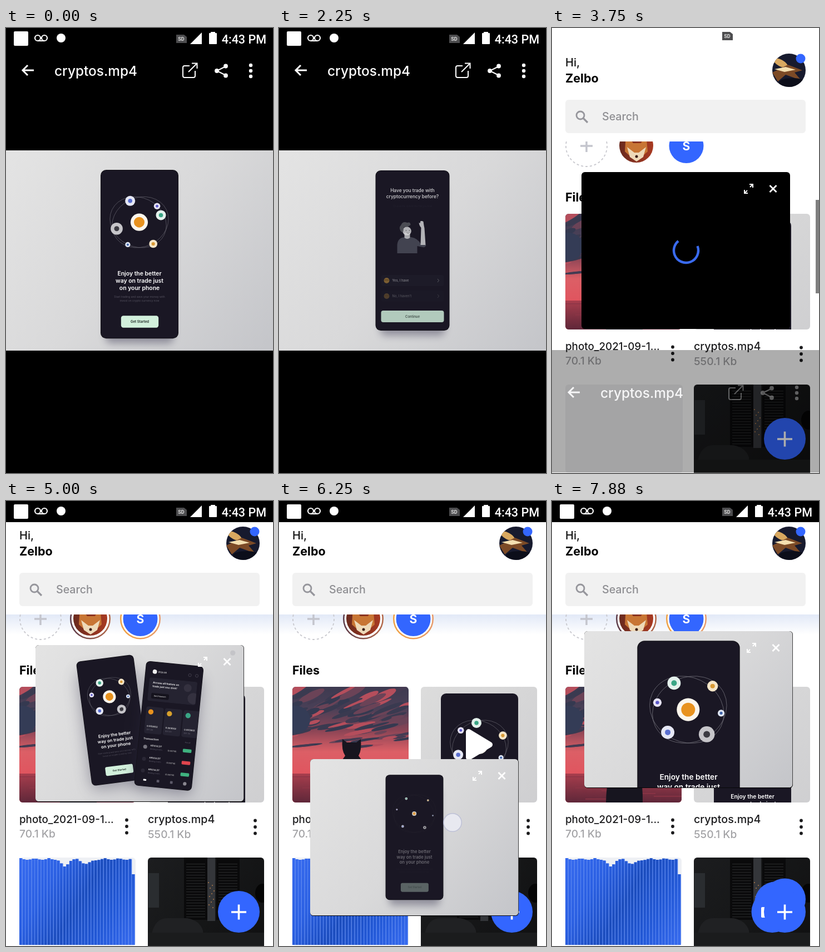
Animation of 480x800 px, one loop 8000 ms. Source, as an HTML page with a canvas:

```html
<!DOCTYPE html>
<html lang="en">
<head>
<meta charset="utf-8">
<title>Video pop-up</title>
<style>
html, body { margin: 0; width: 100%; height: 100%; overflow: hidden; background: #000; }
canvas { display: block; }
</style>
</head>
<body>
<canvas id="stage" width="480" height="800"></canvas>
<script>
const LOOP = 8000, STEP = 125, BLUE = '#3366ff', NIGHT = '#1a1724';
const stage = document.getElementById('stage').getContext('2d');
const sheetCanvas = Object.assign(document.createElement('canvas'), { width: 480, height: 800 });
const sheet = sheetCanvas.getContext('2d');
let g = stage;

const clamp = v => Math.max(0, Math.min(1, v));
const mix = (a, b, p) => a + (b - a) * p;
const ramp = (t, from, length) => clamp((t - from) / length);
const sine = p => (1 - Math.cos(Math.PI * p)) / 2;
const cubic = p => p < .5 ? 4 * p ** 3 : 1 - 4 * (1 - p) ** 3;
const noise = n => Math.abs(Math.sin(n * 12.9898) * 43758.5453) % 1;

// Drawing helpers
function group(draw, { x = 0, y = 0, s = 1, r = 0, a = 1 } = {}) {
  if (a <= 0) return;
  g.save();
  g.globalAlpha *= a;
  g.translate(x, y);
  g.rotate(r * Math.PI / 180);
  g.scale(s, s);
  draw();
  g.restore();
}
function box(x, y, w, h, fill, r = 0) {
  g.beginPath();
  g.roundRect(x, y, w, h, r);
  g.fillStyle = fill;
  g.fill();
}
function disc(x, y, r, fill) {
  g.beginPath();
  g.arc(x, y, Math.max(0, r), 0, 7);
  g.fillStyle = fill;
  g.fill();
}
function ring(x, y, r, color, width, from = 0, to = Math.PI * 2) {
  g.beginPath();
  g.arc(x, y, r, from, to);
  g.strokeStyle = color;
  g.lineWidth = width;
  g.stroke();
}
function blob(x, y, rx, ry, fill, tilt = 0) {
  g.beginPath();
  g.ellipse(x, y, rx, ry, tilt, 0, 7);
  g.fillStyle = fill;
  g.fill();
}
function line(d, color, width) {
  g.strokeStyle = color;
  g.lineWidth = width;
  g.stroke(new Path2D(d));
}
function shape(d, fill) {
  g.fillStyle = fill;
  g.fill(new Path2D(d));
}
function text(s, x, y, size, color, weight = 500, align = 'left', font = 'Inter') {
  g.font = `${weight} ${size}px ${font}, sans-serif`;
  g.fillStyle = color;
  g.textAlign = align;
  g.fillText(s, x, y + size * .36);
}
function blend(x0, y0, x1, y1, ...colors) {
  const fill = g.createLinearGradient(x0, y0, x1, y1);
  colors.forEach((c, i) => fill.addColorStop(i / (colors.length - 1), c));
  return fill;
}
function clipped(x, y, w, h, r, draw) {
  g.save();
  g.beginPath();
  g.roundRect(x, y, w, h, r);
  g.clip();
  draw();
  g.restore();
}
function dots(x, y, gap, r, color) {
  for (const i of [-1, 0, 1]) disc(x, y + i * gap, r, color);
}

// Phone screens, drawn on a body of 133 by 288
const COINS = [ // rest angle, turn, orbit radius, size, colours
  [-118, 100, 39, 8.6, '#e4f1ec', '#3aa585'],
  [-44, 101, 44, 7, '#f6e6c8', '#d99a35'],
  [-167, 125, 41, 5.5, '#e6e3f4', '#5a57c8'],
  [6, 111, 43, 4.4, '#dfe6f4', '#3d62a8'],
  [132, 115, 39.6, 8.6, '#e6e8f5', '#5a6fd0'],
  [53, 111, 40, 10.3, '#c6c5c9', '#3c3b42']
];

function orbit(spin, size, alpha) {
  group(() => {
    for (const side of [-1, 1]) {
      g.beginPath();
      g.ellipse(side * 1.8, 0, 49.5, 42, side * -.45, 0, 7);
      g.strokeStyle = '#77757f';
      g.lineWidth = .55;
      g.stroke();
    }
  }, { x: 66, y: 89.4, a: alpha * alpha });
  group(() => {
    disc(0, 0, 14.8 * size, '#fbf6ec');
    disc(0, 0, 9 * size, '#e8921e');
    for (const [rest, turn, far, r, rim, core] of COINS) {
      const a = (rest + turn * spin) * Math.PI / 180;
      disc(Math.cos(a) * far, Math.sin(a) * far, r * size, rim);
      disc(Math.cos(a) * far, Math.sin(a) * far, r * size * .42, core);
    }
  }, { x: 66, y: 89.4, a: size > 0 ? Math.max(alpha, .8) : 0 });
}

function welcome(spin, show = 1, button = show) {
  orbit(spin, show, show);
  group(() => {
    ['Enjoy the better', 'way on trade just', 'on your phone'].forEach((s, i) =>
      text(s, 66.5, 177 + i * 12.3, 9.9, '#fff', 600, 'center'));
  }, { a: show });
  group(() => {
    text('Start trading and save your money with', 66.5, 216.6, 4.7, '#55525f', 400, 'center');
    text('invest on crypto currency now', 66.5, 223.4, 4.7, '#55525f', 400, 'center');
  }, { a: show * show });
  group(() => {
    box(35, 249, 64, 20.5, '#d2f0dc', 4);
    text('Get Started', 67, 259.3, 5.7, '#1b2622', 600, 'center');
  }, { a: button });
}

function man() {
  shape('M39 149V134Q40 121 52 120H64Q76 122 82 133L91 134Q90 139 85 138L75 136V149Z', '#4b4d5a');
  shape('M81 134L82 103Q79 100 78 94L80 95L81 91H83L84 91L86 92L87 99L88 104L90 134Z', '#d4d4d6');
  shape('M52 112H62V121Q57 125 52 121Z', '#c6c6c9');
  disc(56.5, 109, 7.8, '#d4d4d6');
  shape('M47 111Q40 104 46 98Q49 91 57 94Q63 92 63 98Q58 102 51 102L50 110Z', '#56575d');
  disc(55, 108, .8, '#333');
  disc(61, 108, .8, '#333');
  line('M56 112Q59 114.500 61 112', '#444', .7);
}

function question(t) {
  const from = start => ramp(t, start, 350);
  group(() => {
    text('Have you trade with', 66.5, 35.5, 8.4, '#f4f4f6', 500, 'center');
    text('cryptocurrency before?', 66.5, 47.3, 8.4, '#f4f4f6', 500, 'center');
  }, { a: from(1950) });
  group(() => text('Choose the option that fits you now', 66.5, 64, 4.2, '#65636e', 400, 'center'), { a: from(2200) });
  group(man, { a: from(1960) });
  [['Yes, I have', 198, 2080], ['No, I haven’t', 226, 2160]].forEach(([label, y, start]) => group(() => {
    box(10, y - 10, 113, 20, '#211f2d', 4);
    disc(20, y, 5, '#e2a63d');
    box(16, y - 2, 8, 2, '#4c3418', 1);
    text(label, 30, y, 5.8, '#eee', 500);
    line(`M111.500 ${y - 3}l2.500 3l-2.500 3`, '#bbb', .8);
  }, { a: from(start) }));
  group(() => {
    box(10, 252, 113, 21, '#d2f0dc', 4);
    text('Continue', 66.5, 262.5, 6, '#1b2622', 500, 'center');
  }, { a: from(1960) });
}

function market() {
  const card = '#252331', dim = '#5d5a69';
  disc(22, 23, 5, '#eee');
  text('$126.08', 30, 23, 5, '#ddd', 600);
  ring(103, 23, 3.3, dim, .7);
  ring(119, 23, 3.3, dim, .7);
  clipped(11, 37, 111, 54, 5, () => {
    box(11, 37, 111, 54, card);
    disc(101, 53, 9, '#34313f');
    disc(116, 76, 13, '#34313f');
  });
  text('Access all feature on', 20, 48, 6, '#fff', 600);
  text('trade just one click!', 20, 56.5, 6, '#fff', 600);
  box(19, 72, 41, 13, '#15131d', 3);
  text('Get Premium', 39, 78.5, 4.6, '#ddd', 500, 'center');
  ['#e8921e', '#d8a12c', '#3aa585'].forEach((c, i) => {
    const x = 11 + i * 43;
    clipped(0, 100, 132, 70, 0, () => box(x, 104, 40, 62, card, 5));
    disc(x + 11, 116, 6, c);
    text('0.003602', x + 5, 149, 5.2, '#eee', 600);
    text('$91.99', x + 5, 157, 4.6, dim, 500);
  });
  text('Transaction', 11, 178, 6.2, '#eee', 600);
  text('See all', 107, 178, 4, dim);
  [195, 223, 250].forEach((y, i) => {
    disc(17, y + 2, 4.5, i ? '#2a2735' : '#77757f');
    text('KRV/ULDT', 29, y - 2, 5.2, '#eee', 600);
    text('Binding 0.03%', 29, y + 6, 4, dim);
    text('(0.00710)', 69, y + 6, 4.6, '#ccc');
    box(104, y - 2, 20, 8, i === 1 ? '#e0454e' : '#3fb27f', 2);
  });
  box(20, 271, 7, 4, '#fff', 1);
  for (const x of [51, 82]) box(x, 270, 6, 6, dim, 1);
  disc(116, 273, 4, '#8a8790');
}

function phone(x, y, s, r, content) {
  const lift = Math.abs(r), half = 58 + lift;
  group(() => {
    g.save();
    g.shadowColor = 'rgba(50,48,75,.42)';
    g.shadowBlur = 14 + 2 * lift;
    g.shadowOffsetY = 13 - lift / 2;
    box(-half, -130, half * 2, 270, NIGHT, 9);
    g.restore();
    box(-66.5, -144, 133, 288, '#111015', 9.5);
    box(-65.7, -143.2, 131.4, 286.4, NIGHT, 9);
    group(content, { x: -66.5, y: -144 });
  }, { x, y, s, r });
}
function frontPhone(width, content) {
  const s = width / 133;
  phone(240, 36 - .136 * (width - 133) + 144 * s, s, 0, content);
}

function video(t) {
  clipped(0, 0, 480, 360, 0, () => {
    box(0, 0, 480, 360, blend(20, 0, 460, 360, '#e3e3e3', '#d9d9da', '#c5c6ca'));
    if (t < 4000) {
      frontPhone(140 - 7 * sine(ramp(t, 0, 800)), () => {
        welcome(1 + t / 2800, 1 - ramp(t, 1650, 300));
        question(t);
      });
    } else if (t < 5950) {
      const p = sine(ramp(t, 5450, 450));
      phone(mix(177.6, 240, p), mix(173, 180, p), 1, mix(-7.4, 0, p), () => welcome(0));
      phone(mix(307, 580, p), 186, 1, mix(5.7, 14, p), market);
      if (p === 0 && t >= 4900) disc(454, 18, 6, 'rgba(190,190,194,.7)');
    } else {
      const leaving = 1 - ramp(t, 5950, 460);
      frontPhone(133 + 103 * cubic(ramp(t, 6400, 1500)), () =>
        welcome(0, Math.max(leaving, ramp(t, 7050, 550)), Math.max(leaving, ramp(t, 6900, 800))));
    }
  });
}

function status() {
  box(14, 6, 26, 26, '#fff', 2);
  ring(57, 18, 5, '#fff', 2.2);
  ring(69, 18, 5, '#fff', 2.2);
  line('M57 23H69', '#fff', 2.2);
  disc(99, 18, 8, '#fff');
  shape('M306 12H320L325 16V27H306Z', '#4d4d4f');
  text('SD', 315, 19.8, 9, '#ddd', 700, 'center', 'Roboto');
  shape('M331 29L352 8V29Z', '#fff');
  box(365, 9, 14, 20, '#fff', 1);
  box(368, 7, 8, 4, '#fff');
  text('4:43 PM', 468, 20, 21.5, '#fff', 500, 'right', 'Roboto');
}

function player(t) {
  box(0, 0, 480, 800, '#000');
  line('M50 76H30M39 67L30 76L39 85', '#fff', 3);
  text('cryptos.mp4', 87, 77, 24.4, '#fff');
  line('M330 68H321Q318 68 318 71V86Q318 89 321 89H337Q340 89 340 86V77M328 79L343 64M334 63.500H343.500V73', '#fff', 2);
  line('M395 69L379 77L395 85', '#fff', 2);
  for (const [x, y] of [[379, 77], [395, 68.5], [395, 85.5]]) disc(x, y, 3.9, '#fff');
  dots(440, 77, 10, 3.2, '#fff');
  group(() => video(t), { y: 220 });
}

// Home page
function sunset() {
  box(24, 334, 209, 208, blend(0, 334, 0, 490, '#3d3a50', '#4a4057', '#8a4455', '#dc5f66', '#e0555f'));
  const tones = ['#353950', '#443b52', '#6b4357', '#b54e5c', '#3a3a50'];
  for (let i = 0; i < 90; i++) {
    const depth = noise(i + 200);
    blob(24 + noise(i) * 209, 338 + depth * 105, 10 + noise(i + 50) * 20, 2 + noise(i + 90) * 6 * (1 - depth),
      tones[i % 5], -.5 + depth * .4);
  }
  blob(30, 393, 26, 25, '#343c56');
  box(24, 490, 209, 52, blend(0, 490, 0, 542, '#a83e4d', '#5f2739'));
  for (let i = 0; i < 9; i++) box(24 + i * 47 % 170, 495 + i * 5, 50, 1.5, '#8d3546');
  shape('M114 428L122 434H139L147 428Q149 448 143 458Q164 482 163 542H97Q98 484 119 458Q112 448 114 428Z', '#17151f');
}

function clipThumb() {
  box(255, 334, 209, 208, blend(255, 334, 464, 542, '#dcdcdc', '#cfcfd1'));
  group(() => {
    box(0, 0, 133, 288, NIGHT, 9);
    welcome(.21);
  }, { x: 291, y: 346, s: 1.045 });
  g.lineJoin = 'round';
  shape('M341 415L379 438L341 461Z', '#fff');
  line('M341 415L379 438L341 461Z', '#fff', 10);
  g.lineJoin = 'miter';
}

function waves() {
  box(24, 641, 209, 159, '#eef0f4', 6);
  const fill = blend(24, 660, 232, 790, '#3569ee', '#2a5fe2', '#1b4cbc', '#2258d6', '#3569ee');
  for (let i = 0; i < 37; i++) {
    const dip = 14 * Math.exp(-((i - 14) ** 2) / 2) + 8 * Math.exp(-((i - 21) ** 2) / 5);
    const top = i === 36 ? 671 : 642 + 3 * Math.abs(Math.sin(i * .7)) + dip;
    box(24 + i * 5.62, top, 5.62, 798 - top, '#5583f0');
    box(24 + i * 5.62, top, 4.4, 798 - top, fill);
  }
}

function darkRoom() {
  box(255, 641, 209, 159, blend(255, 641, 464, 800, '#1c1d1f', '#161718', '#101011'));
  box(256, 669, 19, 62, '#2a2d30');
  for (const x of [320, 378]) {
    box(x, 641, 42, 112, '#0a0a0b');
    for (let y = 652; y < 748; y += 5) box(x + 4, y, 34, 1.3, '#242527');
  }
  box(362, 641, 14, 114, '#34363a');
  for (let i = 0; i < 10; i++) disc(364 + i * 7 % 11, 686 + i * 5, 1, '#b07a48');
  shape('M262 778Q268 750 290 750H326Q348 754 354 772V778Z', '#202123');
  box(255, 776, 209, 24, '#1b1c1d');
  blob(461, 705, 13, 17, '#050505');
}

function avatars(loaded) {
  clipped(0, 204, 480, 60, 0, () => {
    if (loaded) box(0, 204, 480, 36, blend(0, 204, 0, 240, '#e2e9f7', '#fff'));
    g.setLineDash([4, 4]);
    ring(62, 212, 37, '#c8c8ce', 1.8);
    g.setLineDash([]);
    line('M51 212H73M62 201V223', '#c4c5cd', 3.5);
    if (loaded) {
      for (const [x, a, b] of [[151.5, '#5a3a48', '#b4694a'], [241.5, '#f0a040', '#e89a6a']]) {
        disc(x, 212, 36.5, blend(x - 36, 0, x + 36, 0, a, b));
        disc(x, 212, 34, '#fff');
      }
    }
    clipped(121, 181, 61, 61, 30.5, () => {
      box(121, 181, 61, 61, blend(121, 0, 182, 0, '#6a2a1e', '#a83a22'));
      shape('M133 190L146 207H160L169 190L172 222L154 238H149L131 222Z', '#c87534');
      shape('M135 214L148 224H156L169 214L164 232L152 240L140 232Z', '#eed9b8');
      disc(152, 231, 2.5, '#3a1c16');
    });
    disc(241.5, 212, 31, BLUE);
    text('S', 241.5, 212.5, 21, '#fff', 700, 'center');
  });
}

function fab(t) {
  const d = 22.5 * ramp(t, 7750, 125);
  if (d) {
    for (const [x, y] of [[1, 0], [0, 1], [.74, .74]]) disc(418.5 - d * x, 738.5 - d * y, 37.5, BLUE);
    box(376, 730, 12, 19, '#fff', 2);
  }
  disc(418.5, 738.5, 37.5, BLUE);
  line('M405 739H432M418.500 725.500V752.500', '#fff', 3.6);
}

function home(t) {
  const loaded = t >= 4300;
  box(0, 0, 480, 800, '#fff');
  text('Hi,', 24, 62, 20, '#111');
  text('Zelbo', 24, 90, 21.5, '#000', 700);
  clipped(396, 46, 60, 60, 30, () => {
    box(396, 46, 60, 60, '#171a2e');
    blob(411, 63, 14, 6, '#d8a860', .5);
    shape('M396 80L424 66L450 76L436 80L448 94L420 84L406 96Z', '#7c4a26');
    shape('M400 74L420 70L438 75L418 79Z', '#f4dfb0');
    blob(432, 98, 24, 8, '#0c0e1a');
  });
  disc(447, 55, 8.5, BLUE);
  box(24, 129, 432, 60, '#f1f1f1', 6);
  ring(51, 157, 7, '#96969c', 2.8);
  line('M56 162L64 170', '#96969c', 3.2);
  text('Search', 90, 159, 19.6, '#8e8e92');
  avatars(loaded);
  text('Files', 24, 304, 21.5, '#000', 700);
  clipped(24, 334, 209, 208, 6, sunset);
  clipped(255, 334, 209, 208, 6, clipThumb);
  text('photo_2021-09-1...', 24, 572, 18.8, '#1b1b1d');
  text('cryptos.mp4', 255, 572, 19.7, '#1b1b1d');
  text('70.1 Kb', 24, 598, 19.2, '#a3a3a6');
  text('550.1 Kb', 255, 599, 19.2, '#a3a3a6');
  dots(217, 585, 11.5, 2.9, '#1b1b1d');
  dots(448, 586, 11.5, 2.9, '#1b1b1d');
  if (loaded) waves(); else box(24, 641, 211, 159, '#f2f2f3', 6);
  clipped(255, 641, 209, 170, 6, darkRoom);
  group(() => box(474, 309, 6, 168, '#808080'), { a: 1 - ramp(t, 4350, 300) });
  fab(t);
  if (t >= 3900) box(0, 0, 480, 38, '#000');
}

function popup(t) {
  const down = sine(ramp(t, 5400, 830)), up = sine(ramp(t, 6270, 640));
  const x = 53 + 3 * down + 2 * up, y = 259 + 205 * down - 230 * up;
  group(() => {
    box(0, 0, 375, 282, '#000', 6);
    if (t < 4400) {
      const a = t / 1000 * Math.PI * 2 + 1.2;
      ring(188, 141, 22, '#3a6bf0', 4.4, a, a + 4.4);
    } else {
      clipped(0, 0, 374.3, 281.3, 6, () => group(() => video(t), { s: .78125 }));
    }
    line('M303 27L308 22M302 22H308V28M298 33L293 38M293 32V38H299', '#fff', 2);
    line('M338.500 24L350.500 36M350.500 24L338.500 36', '#fff', 2.8);
  }, { x, y });
  group(() => {
    disc(x + 256, y + 114, 17, '#b9bdd6');
    disc(x + 256, y + 114, 15.5, '#f0f0f4');
  }, { a: t >= 5350 && t < 6950 ? .85 : 0 });
}

function draw(t) {
  if (t >= 3500) {
    home(t);
    popup(t);
  }
  const slide = sine(ramp(t, 3500, 386));
  if (slide < 1) {
    g = sheet;
    player(t);
    g = stage;
    g.globalAlpha = 1 - .94 * slide;
    g.drawImage(sheetCanvas, 0, 800 * slide);
    g.globalAlpha = 1;
  }
  // The status icons sit higher until the home page takes over
  group(status, { y: t >= 2500 && t < 3900 ? -5 : 0 });
}

function tick() {
  const t = performance.now() % LOOP;
  draw(Math.floor(t / STEP) * STEP);
  requestAnimationFrame(tick);
}
tick();
</script>
</body>
</html>
```
